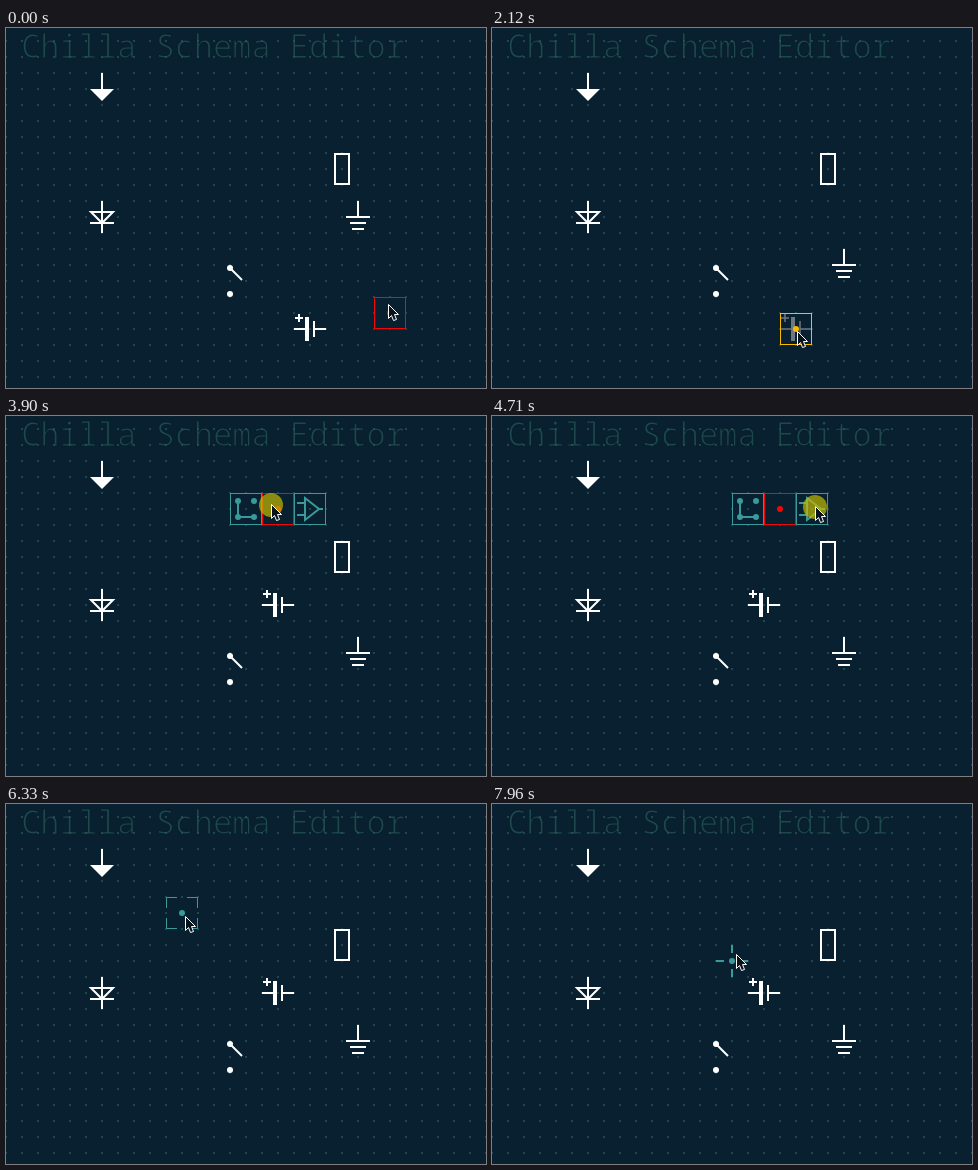
Animation of 480 by 360 pixels, one loop 8 s. Source, as an HTML page with a canvas:

```html
<!DOCTYPE html>
<html lang="en">
<head>
<meta charset="utf-8">
<title>Schema Editor</title>
<style>
html, body { margin: 0; width: 100%; height: 100%; overflow: hidden; background: #08202f; }
canvas { position: absolute; left: 0; top: 0; }
h1 {
  position: absolute; left: 15px; top: -1px; margin: 0; white-space: pre; color: #1d484c;
  font: 200 32px/38px "Noto Sans Mono", "Liberation Mono", monospace;
  -webkit-text-stroke: 1.2px #08202f;
}
</style>
</head>
<body>
<h1>Chilla Schema Editor</h1>
<canvas id="stage" width="480" height="360"></canvas>
<script>
const ctx = document.getElementById('stage').getContext('2d');
const LOOP = 8000, STEP = 81.25;
const WHITE = '#ffffff', TEAL = '#3a9a9a', RED = '#f00808', YELLOW = '#fcb900', GHOST = '#6c7983';
const SIDES = [-1, 1];

// Eased pointer glides between two steps; bow bends the way, waves counts its half swings
const START = { x: 382, y: 276 };
const glides = [
  { from: 3, to: 10, x: 357, y: 190 },
  { from: 11, to: 16, x: 359, y: 242 },
  { from: 17, to: 24, x: 306, y: 306 },
  { from: 25, to: 36, x: 276, y: 187 },
  { from: 36, to: 43, x: 265, y: 88, bowX: 28 },
  { from: 49, to: 59, x: 325, y: 90 },
  { from: 64, to: 70, x: 240, y: 105, bowY: -20 },
  { from: 70, to: 78, x: 176, y: 118, bowY: 20, waves: 2 },
  { from: 82, to: 86, x: 140, y: 126 },
  { from: 89, to: 95, x: 262, y: 128, bowY: -14 },
  { from: 95, to: 98, x: 244, y: 150 }
];

function pointerAt(n) {
  let { x, y } = START;
  for (const g of glides) {
    const u = Math.max(0, Math.min(1, (n - g.from) / (g.to - g.from)));
    const ease = u * u * (3 - 2 * u);
    const swing = Math.sin(Math.PI * ease * (g.waves || 1));
    x += (g.x - x) * ease + (g.bowX || 0) * swing;
    y += (g.y - y) * ease + (g.bowY || 0) * swing;
  }
  return [Math.round(x), Math.round(y)];
}

const snap = ([x, y]) => [Math.round(x / 16) * 16, Math.floor((y - 13) / 16 + 0.63) * 16 + 13];

function line(...pts) {
  ctx.beginPath();
  for (let i = 0; i < pts.length; i += 2) ctx.lineTo(pts[i], pts[i + 1]);
}
function stroke(...pts) { line(...pts); ctx.stroke(); }
function outline(...pts) { line(...pts); ctx.closePath(); ctx.stroke(); }
const bar = (y, half) => stroke(-half, y, half, y);
function dot(x, y, r) {
  ctx.beginPath();
  ctx.arc(x, y, r, 0, 7);
  ctx.fill();
}
function at([x, y], color, width, draw) {
  ctx.save();
  ctx.translate(x, y);
  ctx.strokeStyle = ctx.fillStyle = color;
  ctx.lineWidth = width;
  draw();
  ctx.restore();
}

const symbols = {
  arrow() {
    stroke(0, -16, 0, 1);
    line(-12, 0, 12, 0, 0, 12);
    ctx.fill();
  },
  diode() {
    stroke(0, -16, 0, 16);
    bar(6, 12);
    outline(-11, -5, 11, -5, 0, 6);
  },
  resistor() { ctx.strokeRect(-7, -15, 14, 30); },
  ground() {
    stroke(0, -16, 0, 0);
    [12, 8, 6].forEach((half, i) => bar(i * 6, half));
  },
  contact() {
    for (const s of SIDES) dot(0, s * 13, 3);
    stroke(0, -13, 12, -1);
  },
  battery() {
    stroke(-15, -11, -7, -11);
    stroke(-11, -15, -11, -7);
    stroke(-16, 0, -5, 0);
    ctx.fillRect(-5, -12, 4, 24);
    stroke(4, -8, 4, 8);
    stroke(4, 0, 16, 0);
  },
  wire() {
    for (const sx of SIDES) for (const sy of SIDES) dot(sx * 8, sy * 8, 3);
    stroke(-8, -8, -8, 8, 8, 8);
  },
  amp() {
    outline(-5, -11, -5, 11, 9, 0);
    for (const s of SIDES) stroke(-13, s * 6, -5, s * 6);
    stroke(9, 0, 13, 0);
  }
};

const frame = () => ctx.strokeRect(-15.5, -15.5, 31, 31);

const markers = {
  box() {
    frame();
    dot(0, 0, 3);
  },
  corners() {
    for (const sx of SIDES) for (const sy of SIDES)
      stroke(sx * 5, sy * 15.5, sx * 15.5, sy * 15.5, sx * 15.5, sy * 5);
    dot(0, 0, 3);
  },
  cross() {
    ctx.lineWidth = 2;
    for (const s of SIDES) {
      stroke(s * 8, 0, s * 16, 0);
      stroke(0, s * 8, 0, s * 16);
    }
    dot(0, 0, 3);
  }
};

function drawGrid() {
  ctx.fillStyle = '#2c5358';
  for (let y = 13; y < 360; y += 16)
    for (let x = 0; x <= 480; x += 16) dot(x, y, 1);
}

function drawPointer([x, y]) {
  at([x + 0.5, y + 0.5], WHITE, 1, () => {
    line(0, 0, 0, 14, 3, 11, 5, 16, 8, 15, 6, 10, 10, 10);
    ctx.closePath();
    ctx.fillStyle = '#08131c';
    ctx.fill();
    ctx.stroke();
  });
}

function drawMenu([x, y]) {
  ['wire', 'amp'].forEach((name, i) => at([x + SIDES[i] * 32, y], TEAL, 1, () => {
    frame();
    ctx.lineWidth = 2;
    symbols[name]();
  }));
}

function render(n) {
  const tip = pointerAt(n), cell = snap(tip);
  const between = (a, b) => n >= a && n < b;
  const dragged = between(12, 18) ? 'ground' : between(26, 37) ? 'battery' : '';
  const menuOpen = between(48, 62) || between(81, 90);
  const mode = n < 62 ? 'box' : n < 90 ? 'corners' : 'cross';
  const spots = {
    arrow: [96, 61], diode: [96, 189], resistor: [336, 141], contact: [224, 253],
    ground: [352, n < 12 ? 189 : 237],
    battery: n < 26 ? [304, 301] : [272, 189]
  };
  if (dragged) spots[dragged] = cell;

  ctx.clearRect(0, 0, 480, 360);
  drawGrid();
  for (const name in spots) {
    const ghost = name === dragged;
    at(spots[name], ghost ? GHOST : WHITE, ghost ? 1.5 : 2, symbols[name]);
  }

  let center = cell;
  if (menuOpen) {
    const [x, y] = n < 62 ? [272, 93] : [176, 125];
    center = [tip[0] > x + 48 ? x + 16 : x, y];
    drawMenu(center);
  }
  const hover = Object.values(spots).some(([x, y]) => x === cell[0] && y === cell[1]);
  at(center, mode !== 'box' ? TEAL : hover ? YELLOW : RED, 1, markers[mode]);
  if (menuOpen) at(tip, 'rgba(200,190,0,.68)', 1, () => dot(0, 1, 12));
  drawPointer(tip);
}

function tick(now) {
  render(Math.floor((now % LOOP) / STEP + 0.05));
  requestAnimationFrame(tick);
}
render(0);
requestAnimationFrame(tick);
</script>
</body>
</html>
```
